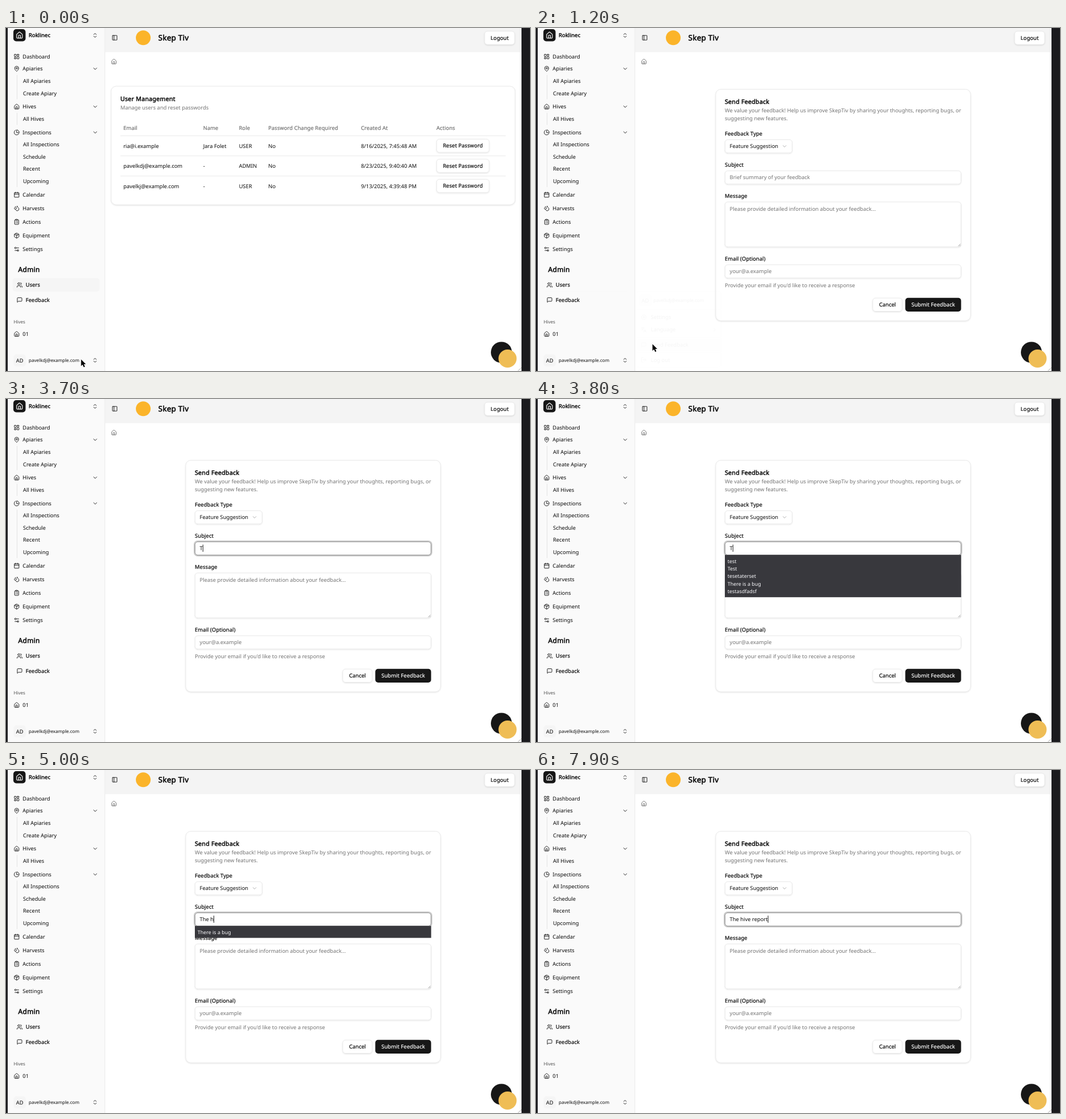
These frames come from a looping animation (924 px wide and 606 px high, 8000 ms). An HTML page:

```html
<!DOCTYPE html>
<html lang="en">
<head>
<meta charset="utf-8">
<title>Feedback form</title>
<style>
html, body { margin: 0; width: 100%; height: 100%; overflow: hidden; background: #fff; }
svg { display: block; width: 924px; height: 606px; font-family: "Noto Sans", "Open Sans", sans-serif; }
text { white-space: pre; text-rendering: geometricPrecision; }
/* In-between weights, made from the regular face */
.medium { stroke-width: .022em; letter-spacing: .01em; }
.semi { stroke-width: .045em; letter-spacing: .02em; }
</style>
</head>
<body>
<svg id="stage" viewBox="0 0 924 606" xmlns="http://www.w3.org/2000/svg">
  <defs>
    <filter id="soft" x="-10%" y="-10%" width="120%" height="125%">
      <feDropShadow dx="0" dy="0.9" stdDeviation="0.9" flood-color="#000" flood-opacity="0.13"/>
    </filter>
    <filter id="lift" x="-10%" y="-10%" width="120%" height="125%">
      <feDropShadow dx="0" dy="2.5" stdDeviation="2" flood-color="#000" flood-opacity="0.13"/>
    </filter>
  </defs>
</svg>
<script>
const LOOP = 8000, STEP = 100;
const BASE = 9.38, SMALL = 8.04, TITLE = 10.72;
const INK = '#0a0a0a', GREY = '#737373', LINE = '#e5e5e5';
const MAIL = 'pavelkdj@example.com';
const stage = document.getElementById('stage');

// Path fragments on a 24-unit grid
const ring = (x, y, r) => `M${x - r} ${y}a${r} ${r} 0 1 0 ${2 * r} 0a${r} ${r} 0 1 0 ${-2 * r} 0`;
const box = (x, y, w, h) => `M${x + 1} ${y}h${w - 2}q1 0 1 1v${h - 2}q0 1-1 1h${2 - w}q-1 0-1-1v${2 - h}q0-1 1-1`;

const ICONS = {
  dash: box(3, 3, 7, 9) + box(14, 3, 7, 5) + box(14, 12, 7, 9) + box(3, 16, 7, 5),
  pin: 'M20 10c0 5-5.5 10.2-7.4 11.8a1 1 0 0 1-1.2 0C9.5 20.2 4 15 4 10a8 8 0 0 1 16 0' + ring(12, 10, 3),
  house: 'M15 21v-8a1 1 0 0 0-1-1h-4a1 1 0 0 0-1 1v8M3 10a2 2 0 0 1 .7-1.5l7-6a2 2 0 0 1 2.6 0l7 6A2 2 0 0 1 21 10v9a2 2 0 0 1-2 2H5a2 2 0 0 1-2-2z',
  pie: 'M21.2 15.9A10 10 0 1 1 8 2.8M22 12A10 10 0 0 0 12 2v10z',
  calendar: 'M8 2v4M16 2v4M3 10h18' + box(3, 4, 18, 18),
  drops: 'M7 16.3c2.2 0 4-1.8 4-4 0-1.2-.6-2.3-1.7-3.2S7.3 6.8 7 5.3c-.3 1.5-1.1 2.8-2.3 3.8S3 11.1 3 12.3c0 2.2 1.8 4 4 4zM12.6 6.6A11 11 0 0 0 14 3c.5 2.5 2 4.9 4 6.5s3 3.5 3 5.5a7 7 0 0 1-11.9 5',
  list: box(8, 2, 8, 4) + 'M16 4h2a2 2 0 0 1 2 2v14a2 2 0 0 1-2 2H6a2 2 0 0 1-2-2V6a2 2 0 0 1 2-2h2M12 11h4M12 16h4M8 11h.01M8 16h.01',
  crate: 'M21 8a2 2 0 0 0-1-1.7l-7-4a2 2 0 0 0-2 0l-7 4A2 2 0 0 0 3 8v8a2 2 0 0 0 1 1.7l7 4a2 2 0 0 0 2 0l7-4A2 2 0 0 0 21 16ZM3.3 7l8.7 5 8.7-5M12 22V12M7.5 4.3l9 5.1',
  sliders: 'M20 7h-9M14 17H5' + ring(17, 17, 3) + ring(7, 7, 3),
  users: 'M16 21v-2a4 4 0 0 0-4-4H6a4 4 0 0 0-4 4v2M22 21v-2a4 4 0 0 0-3-3.9M16 3.1a4 4 0 0 1 0 7.8' + ring(9, 7, 4),
  chat: 'M21 15a2 2 0 0 1-2 2H7l-4 4V5a2 2 0 0 1 2-2h14a2 2 0 0 1 2 2z',
  down: 'M6 9l6 6 6-6',
  right: 'M9 18l6-6-6-6',
  sort: 'M7 15l5 5 5-5M7 9l5-5 5 5',
  panel: 'M9 3v18' + box(3, 3, 18, 18),
  gear: ring(12, 12, 9) + ring(12, 12, 3),
  lang: 'M5 8l6 6M4 14l6-6 2-3M2 5h12M7 2h1M22 22l-5-10-5 10M14 18h6',
  exit: 'M9 21H5a2 2 0 0 1-2-2V5a2 2 0 0 1 2-2h4M16 17l5-5-5-5M21 12H9'
};

// Markup helpers; cy is the middle of a line of text
const text = (x, cy, str, { size = BASE, weight, fill = INK, anchor = 'start' } = {}) =>
  `<text x="${x}" y="${cy + size * 0.37}" font-size="${size}" fill="${fill}" text-anchor="${anchor}"${weight ? ` class="${weight}" stroke="${fill}"` : ''}>${str}</text>`;
const rect = (x, y, w, h, fill, r = 0, extra = '') =>
  `<rect x="${x}" y="${y}" width="${w}" height="${h}" rx="${r}" fill="${fill}" ${extra}/>`;
const framed = (x, y, w, h, r = 5, extra = '') =>
  rect(x + 0.35, y + 0.35, w - 0.7, h - 0.7, '#fff', r, `stroke="${LINE}" stroke-width="0.8" ${extra}`);
const icon = (name, cx, cy, color = INK, size = 10.72) =>
  `<path d="${ICONS[name]}" transform="translate(${cx - size / 2} ${cy - size / 2}) scale(${size / 24})" fill="none" stroke="${color}" stroke-width="2" stroke-linecap="round" stroke-linejoin="round"/>`;
const button = (x, y, w, label) =>
  framed(x, y, w, 24.1, 5, 'filter="url(#soft)"') + text(x + w / 2, y + 12, label, { weight: 'medium', anchor: 'middle' });

function layer(markup) {
  const g = document.createElementNS('http://www.w3.org/2000/svg', 'g');
  g.innerHTML = markup;
  stage.append(g);
  return g;
}
const fade = (g, a) => g.setAttribute('opacity', Math.max(0, Math.min(1, a)));
const show = (g, on) => g.setAttribute('display', on ? 'inline' : 'none');
const place = (g, x, y) => g.setAttribute('transform', `translate(${x} ${y})`);

function sidebar() {
  const top = [
    ['dash', 'Dashboard', 50.5], ['pin', 'Apiaries', 72, 1], ['house', 'Hives', 139, 1],
    ['pie', 'Inspections', 184.5, 1], ['calendar', 'Calendar', 294.5], ['drops', 'Harvests', 318.5],
    ['list', 'Actions', 342.5], ['crate', 'Equipment', 366.7], ['sliders', 'Settings', 390.8]
  ];
  const groups = [
    [93.7, ['All Apiaries', 'Create Apiary']], [160.5, ['All Hives']],
    [206, ['All Inspections', 'Schedule', 'Recent', 'Upcoming']]
  ];
  let s = rect(13, 2, 21.5, 21.5, '#171717', 5) + icon('house', 23.8, 12.8, '#fff', 13.4)
    + text(40, 13, 'Roklinec', { weight: 'semi' }) + icon('sort', 157, 13);
  for (const [name, label, y, open] of top)
    s += icon(name, 18.8, y) + text(29.3, y, label) + (open ? icon('down', 157.3, y) : '');
  for (const [y, labels] of groups) {
    s += rect(19, y - 10.7, 0.8, labels.length * 21.44, '#dedede');
    labels.forEach((label, i) => s += text(30, y + i * 21.44, label));
  }
  return s + text(21.6, 427, 'Admin', { size: 12.06, weight: 'semi' })
    + icon('users', 24, 454) + text(34.7, 454, 'Users', { weight: 'medium' })
    + icon('chat', 24, 480.6) + text(34.7, 480.6, 'Feedback', { weight: 'medium' })
    + text(13.4, 519.4, 'Hives', { size: SMALL, fill: '#525252' })
    + icon('house', 18.8, 540.7) + text(29.3, 540.7, '01')
    + rect(13.4, 576.5, 21.4, 21.4, '#f5f5f5', 5) + text(24.1, 587.2, 'AD', { anchor: 'middle' })
    + text(40, 587.2, MAIL, { size: SMALL }) + icon('sort', 157, 587);
}

function header() {
  return rect(174.5, 0, 734.5, 42.7, '#f4f4f4') + icon('panel', 191.7, 17.2)
    + '<circle cx="242" cy="17.2" r="13" fill="#fbb42a"/>'
    + text(268.6, 17.2, 'Skep Tiv', { size: 13.4, weight: 'semi' })
    + button(843.7, 5.5, 53.6, 'Logout') + icon('house', 190.3, 59.4, '#666');
}

function userTable() {
  const cols = [207, 347.7, 410.7, 462.5, 626, 759];
  const heads = ['Email', 'Name', 'Role', 'Password Change Required', 'Created At', 'Actions'];
  const rows = [
    ['ria@i.example', 'Jara Folet', 'USER', 'No', '8/16/2025, 7:45:48 AM'],
    [MAIL, '-', 'ADMIN', 'No', '8/23/2025, 9:40:40 AM'],
    ['pavelkj@example.com', '-', 'USER', 'No', '9/13/2025, 4:39:48 PM']
  ];
  let s = framed(185, 102.6, 713, 210, 9, 'filter="url(#soft)"')
    + text(201.7, 125, 'User Management', { size: TITLE, weight: 'semi' })
    + text(201.7, 140.5, 'Manage users and reset passwords', { fill: GREY });
  heads.forEach((h, i) => s += text(cols[i], 176.7, h, { weight: 'medium', fill: GREY }));
  rows.forEach((row, r) => {
    const y = 208.2 + r * 35.5;
    s += rect(201.7, y - 18.2, 679.5, 0.8, LINE);
    row.forEach((cell, i) => s += text(cols[i], y, cell));
    s += button(759, y - 12.2, 93.3, 'Reset Password');
  });
  return s;
}

function form() {
  const label = (y, str) => text(333, y, str, { weight: 'medium' });
  const hint = (x, y, str) => text(x, y, str, { fill: GREY });
  const field = (y, h) => framed(333, y, 416.7, h, 5, 'filter="url(#soft)"');
  return framed(316.6, 108, 450, 409.5, 9, 'filter="url(#soft)"')
    + text(333, 130.3, 'Send Feedback', { size: TITLE, weight: 'semi' })
    + hint(333, 146, 'We value your feedback! Help us improve SkepTiv by sharing your thoughts, reporting bugs, or')
    + hint(333, 159.4, 'suggesting new features.')
    + label(187, 'Feedback Type') + framed(333, 197, 119, 24, 5, 'filter="url(#soft)"')
    + text(341.6, 209, 'Feature Suggestion') + icon('down', 438.3, 209, '#a6a6a6')
    + label(241.8, 'Subject') + field(252, 24)
    + label(296.7, 'Message') + field(307, 80)
    + hint(341.6, 319.7, 'Please provide detailed information about your feedback...')
    + '<path d="M744.5 385.5l4-4M747 385.5l1.7-1.7" stroke="#777" stroke-width=".7"/>'
    + label(407.7, 'Email (Optional)') + field(418, 24) + hint(341.6, 430, 'your@a.example')
    + hint(333, 454.2, "Provide your email if you'd like to receive a response")
    + button(593.5, 476.8, 52.5, 'Cancel') + rect(651.2, 476.8, 98.4, 24.1, '#171717', 5)
    + text(700.4, 488.8, 'Submit Feedback', { weight: 'medium', fill: '#fafafa', anchor: 'middle' });
}

function accountMenu() {
  const items = [['gear', 'Settings', 511], ['lang', 'Language', 533], ['chat', 'Send Feedback', 560], ['exit', 'Log out', 586.3]];
  let s = framed(176.7, 464.5, 150, 135.5, 5, 'filter="url(#lift)"')
    + rect(182, 470.5, 21.4, 21.4, '#f5f5f5', 5) + text(192.7, 481.2, 'AD', { anchor: 'middle' })
    + text(207, 481.2, MAIL, { size: SMALL }) + '<g id="hover"></g>'
    + [497.5, 546.7, 573.2].map(y => rect(177, y, 149.4, 0.7, LINE)).join('');
  for (const [name, label, y] of items) s += icon(name, 190, y, GREY) + text(202.5, y, label);
  return s + icon('right', 315, 533, GREY);
}

// Fixed window parts, then the layers that change
layer(rect(0, 0, 924, 606, '#fff') + rect(0, 0, 3, 606, '#1b1b1e') + rect(3, 0, 171, 606, '#fafafa') + rect(173.8, 0, 0.9, 606, LINE));
const activeItem = layer(rect(11.5, 442, 153.5, 23.5, '#f5f5f5', 5));
layer(sidebar() + header());
const tablePage = layer(userTable());
const formPage = layer(form());
const focus = layer(rect(332, 251, 418.7, 26, 'none', 6, 'stroke="#a1a1a1" stroke-opacity=".55" stroke-width="2"')
  + rect(333.35, 252.35, 416, 23.3, 'none', 5, 'stroke="#8c8c8c" stroke-width=".9"'));
const hintText = layer(text(341.6, 264, 'Brief summary of your feedback', { fill: GREY }));
const typed = layer(text(341.6, 264, '')).firstChild;
const caret = layer(rect(0, 257.3, 0.9, 12.6, '#000'));
const popup = layer('');
layer('<circle cx="873.6" cy="573" r="18.6" fill="#171717"/><circle cx="884.4" cy="584" r="16" fill="#efbd55"/>'
  + rect(909, 0, 15, 606, '#1b1b1e') + '<path d="M902.5 606l6.5-6" stroke="#9a9a9a" stroke-width=".8"/>');
const menu = layer(accountMenu());
const hover = document.getElementById('hover');
hover.innerHTML = rect(179.4, 549.3, 144.6, 21.4, '#f4f4f4', 4);

const pointerLook = 'fill="#000" stroke="#fff" stroke-width=".9" stroke-linejoin="round" paint-order="stroke"';
const pointers = {
  arrow: layer(`<path d="M.4.4V12.2L3.1 9.8 5.1 14.2 7.2 13.2 5.2 9H8.8Z" ${pointerLook}/>`),
  hand: layer(`<path d="M-1.2 1.2q1.2-1.5 2.4 0V5.2L5 6q1.3.4 1.2 2-.1 3-1.5 6H-1.7Q-3.5 11-6 8.6q.6-1.8 2.6-.7l2.2 1.3Z" ${pointerLook}/>`),
  beam: layer('<path d="M-2.5-6.5Q0-6.5 0-5V5Q0 6.5-2.5 6.5M2.5-6.5Q0-6.5 0-5M2.5 6.5Q0 6.5 0 5" fill="none" stroke="#000" stroke-width="1"/>')
};

// Pointer path: time, x, y
const PATH = [
  [0, 132, 585], [400, 132, 585], [500, 136, 584], [700, 166, 574], [900, 198, 561], [1000, 205, 558],
  [1400, 205, 558], [1500, 211, 547], [1600, 236, 501], [1700, 279, 424], [1800, 323, 344],
  [1900, 354, 286], [2000, 373, 251], [2100, 381, 235], [2200, 384, 250], [2300, 386, 263]
];
function pointerAt(t) {
  const i = PATH.findIndex(p => p[0] > t);
  if (i < 0) return PATH[PATH.length - 1].slice(1);
  const [t0, x0, y0] = PATH[i - 1], [t1, x1, y1] = PATH[i];
  const k = (t - t0) / (t1 - t0);
  return [x0 + (x1 - x0) * k, y0 + (y1 - y0) * k];
}

const PHRASE = 'The hive report';
const KEYS = [3700, 4100, 4300, 4500, 5000, 5200, 5500, 5700, 5900, 6700, 6800, 7200, 7400, 7700, 7900];
const PAST = ['test', 'Test', 'tesetaterset', 'There is a bug', 'testasdfadsf'];

// An earlier entry is offered while it contains every typed word
function suggestions(value) {
  const words = value.toLowerCase().trim().split(' ');
  const hits = PAST.filter(p => words.every(w => p.toLowerCase().includes(w)));
  if (!hits.length) return '';
  return rect(333, 275.4, 416.7, hits.length * 13.4 + 7.8, '#38383d')
    + hits.map((p, i) => text(337.7, 286.2 + i * 13.4, p, { size: 8.93, fill: '#fbfbfe' })).join('');
}

function draw(t) {
  const onForm = t >= 1100;
  show(tablePage, !onForm);
  show(formPage, onForm);
  fade(activeItem, onForm ? (1220 - t) / 200 : 1);

  const menuIn = Math.min(1, (t - 350) / 150);
  const menuOut = t < 1100 ? 1 : t < 1200 ? 0.5 : 0.035;
  show(menu, t >= 400 && t < 1500);
  fade(menu, menuIn * menuOut);
  place(menu, (menuIn - 1) * 5, 0);
  show(hover, t >= 900);

  const count = KEYS.filter(k => k <= t).length;
  const value = PHRASE.slice(0, count);
  fade(focus, (t - 2300) / 300);
  show(hintText, onForm && !count);
  typed.textContent = value;
  show(caret, t >= 2400);
  place(caret, 341.6 + (count ? typed.getComputedTextLength() : 0), 0);
  popup.innerHTML = t >= 3800 ? suggestions(value) : '';

  const shape = t >= 3700 ? '' : t >= 2300 ? 'beam' : t >= 100 && t < 500 ? 'hand' : 'arrow';
  const [x, y] = pointerAt(t);
  for (const name in pointers) {
    show(pointers[name], name === shape);
    place(pointers[name], x, y);
  }
}

function tick() {
  const t = performance.now() % LOOP;
  draw(Math.floor(t / STEP) * STEP);
  requestAnimationFrame(tick);
}
tick();
</script>
</body>
</html>
```
